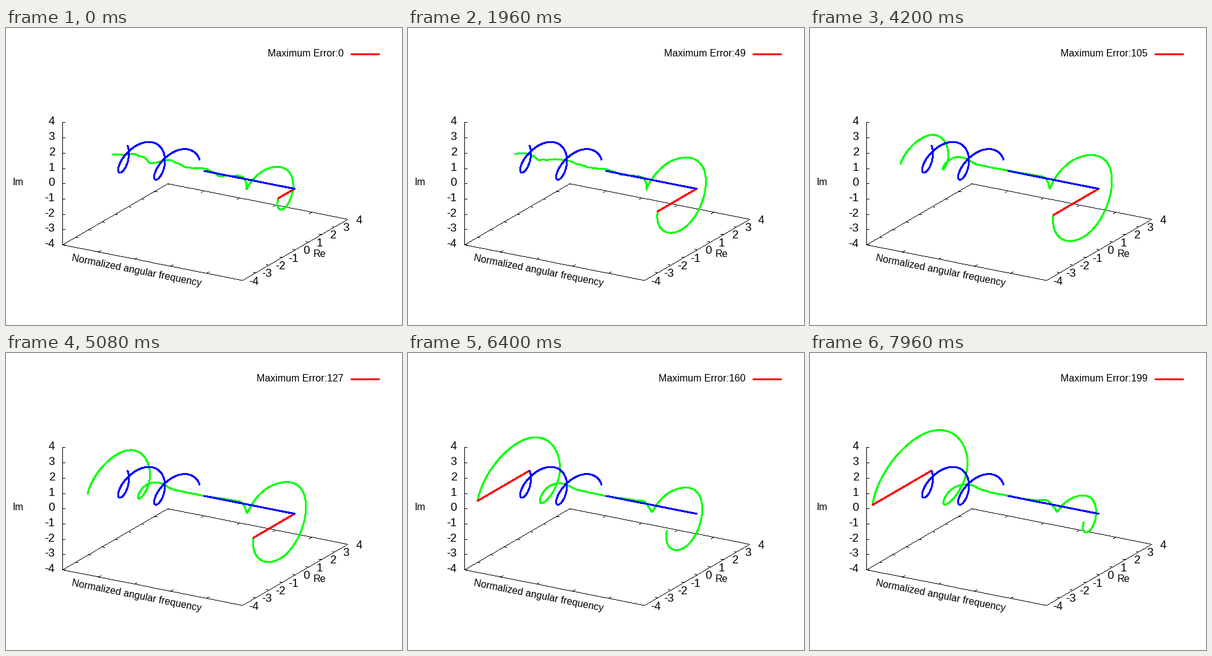
A matplotlib script that plays this animation: 640x480 px, repeating every 8 s.

```python
import numpy as np
import matplotlib.pyplot as plt
from matplotlib.animation import FuncAnimation

plt.rcParams["font.family"] = "Liberation Sans"
FRAMES, STEP_MS = 200, 40
DELAY = 10 * np.pi
PT = 0.72                      # points per pixel at 100 dpi

fig = plt.figure(figsize=(6.4, 4.8), dpi=100, facecolor="white")
ax = fig.add_axes([0, 0, 1, 1])
ax.set_xlim(-0.5, 639.5)
ax.set_ylim(479.5, -0.5)
ax.axis("off")


def project(x, re, im):
    """Oblique view of (frequency 0..1, Re -4..4, Im -4..4) in pixels."""
    u, v = (re + 4) / 8, (im + 4) / 8
    return 90 + 291 * x + 169.8 * u, 350 + 57.5 * x - 98.8 * u - 197.5 * v


def thin(p, q):
    """Hard-edged line, one pixel wide."""
    n = int(max(abs(q[0] - p[0]), abs(q[1] - p[1]))) + 1
    xs, ys = (np.round(np.linspace(p[i], q[i], n + 1)) for i in (0, 1))
    ax.plot(xs, ys, ",", color="black", antialiased=False, zorder=1)


def tick(p, dx, dy):
    thin(p, (p[0] + dx, p[1] + dy))


def label(x, y, s, size=16, ha="center", rot=0):
    return ax.text(x, y, s, fontsize=size * PT, ha=ha, va="baseline",
                   rotation=rot, rotation_mode="anchor")


def thick(color, z):
    return ax.plot([], [], color=color, lw=2 * PT, zorder=z, snap=False,
                   antialiased=False, solid_capstyle="round",
                   solid_joinstyle="round")[0]


# box, ticks and labels
corners = [project(x, r, -4) for x, r in [(0, -4), (1, -4), (1, 4), (0, 4)]]
for p, q in zip(corners, corners[1:] + corners[:1]):
    thin(p, q)
thin(project(0, -4, -4), project(0, -4, 4))
for i in range(1, 5):
    tick(project(i / 5, -4, -4), 4, -2.3)
    tick(project(i / 5, 4, -4), -4, 2.3)
for n in range(-4, 5):
    right = project(1, n, -4)
    tick(right, -4, -0.8)
    tick(project(0, n, -4), 4, 0.8)
    label(right[0] + 19, right[1] + 6.6, str(n), 18.67)
    zx, zy = project(0, -4, n)
    tick((zx, zy), 4, 0)
    label(78.5, zy + 3.5, str(n), 18.67, "right")
label(18.5, 254, "Im")
label(506, 370, "Re")
label(209.3, 396, "Normalized angular frequency", rot=-11.2)

# key
caption = label(545, 46, "", ha="right")
thick("red", 5).set_data([558, 602], [42, 42])

# wanted response: unit helix in the pass band, zero in the stop band
xp, xs = np.linspace(0, 0.4, 160), np.array([0.5, 1])
thick("blue", 4).set_data(*project(xp, np.cos(DELAY * xp), -np.sin(DELAY * xp)))
thick("blue", 4).set_data(*project(xs, 0 * xs, 0 * xs))

# filter response at 21 even frequencies for three phases of the turn
KEYS = np.array([0., 105, 199])
POSES = np.array([
    [-.15, 0, .3, .1+.06j, -.05-.15j, -.05+.04j, .3+.05j, .1+.08j, -.05+.04j,
     .05j, .17+.03j, .03j, -.2, -.05+.05j, .15-.02j, -.22-.34j, -.8+.1j,
     .08+.95j, 1.15, -1.32j, -1.23],
    [-1.36, .15+1.22j, .9-.2j, -.2-.62j, -.4+.22j, .1+.2j, .1, .02j, 0,
     .02j, .02j, .02j, .04j, .06j, .03j, -.35-.25j, -.85+.2j,
     .35+1.45j, 2.3-.2j, -.1-3j, -3.45],
    [-3.5, -.2+3.15j, 2.35+.25j, .15-1.4j, -.5-.25j, -.1+.2j, .15+.1j,
     .05+.03j, 0, 0, .02j, 0, .02j, .05+.04j, .2+.07j, -.12j, -.38-.12j,
     -.15+.66j, .9+.25j, .15-1.15j, -1.13]])


def basis(deg):
    t = np.radians(deg)
    return np.stack([np.ones_like(t), np.cos(t), np.sin(t)], axis=-1)


knots = np.arange(21)
slow = POSES * np.exp(0.5j * DELAY * knots / 20)     # half the delay taken out
COEF = np.linalg.solve(basis(KEYS), slow)
x = np.linspace(0, 1, 401)
cell = np.minimum((x * 20).astype(int), 19)
s = x * 20 - cell


def response(n):
    d = basis(float(n)) @ COEF
    # the far end swings slightly ahead of a pure sine
    d[-1] += 4.3e-7 * n * (105 - n) * (199 - n) * np.sign(d[-1].real)
    d = np.concatenate([[np.conj(d[1])], d, [np.conj(d[-2])]])
    a, b, c, e = (d[cell + i] for i in range(4))     # Catmull-Rom
    mid = b + s / 2 * (c - a + s * (2*a - 5*b + 4*c - e + s * (3*(b - c) + e - a)))
    return mid * np.exp(-0.5j * DELAY * x)


curve = thick("#00ff00", 2)
error = thick("red", 3)


def draw(n):
    h = response(n)
    curve.set_data(*project(x, h.real, h.imag))
    if abs(h[0] - 1) > abs(h[-1]):
        at, want, got = 0, 1, h[0].real
    else:
        at, want, got = 1, 0, h[-1].real
    error.set_data(*project(at, np.array([want, got]), 0))
    caption.set_text(f"Maximum Error:{n}")
    return curve, error, caption


anim = FuncAnimation(fig, draw, frames=FRAMES, interval=STEP_MS,
                     repeat=True, repeat_delay=0)
plt.show()
```
